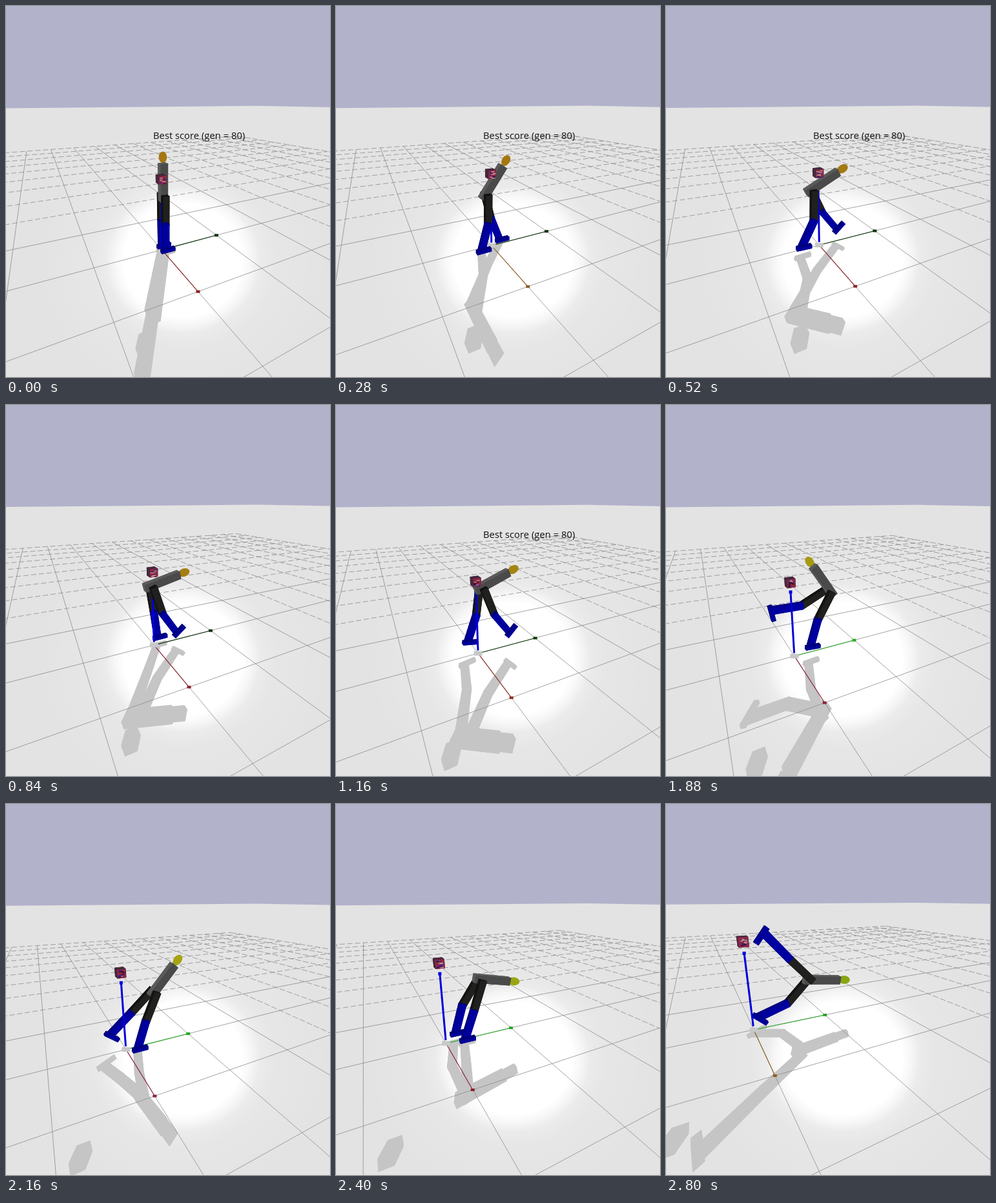
An HTML page with a canvas for the animation above (2840 ms loop, 502 by 575 pixels).

```html
<!DOCTYPE html>
<html lang="en">
<head>
<meta charset="utf-8">
<title>Walker</title>
<style>
html, body { margin: 0; width: 100%; height: 100%; overflow: hidden; }
canvas { display: block; }
</style>
</head>
<body>
<canvas id="stage" width="502" height="575"></canvas>
<script>
const ctx = document.getElementById('stage').getContext('2d');
const W = 502, H = 575, LOOP = 2840, STEP = 40;
const FOCAL = 391, CX = 251, CY = 306, REACH = 3.29;
const rad = deg => deg * Math.PI / 180;
const sinP = Math.sin(rad(22)), cosP = Math.cos(rad(22));
const sinA = Math.sin(rad(26.3)), cosA = Math.cos(rad(26.3));
const LIGHT = [1.24, -0.735];   // ground offset of a shadow per unit of height

// Key poses: seconds, then angles of torso, near thigh and shank, far thigh and shank
const poses = [
  [0,     90,  -90,  -90,  -90,  -90],
  [0.52,  26,  -92, -118,  -66,  -54],
  [0.84,  13,  -72,  -57,  -82,  -83],
  [1.48,  29,  -67,  -51, -115, -138],
  [1.88, 124, -120, -107, -155, -181],
  [2.4,  -12, -109, -110, -125, -107],
  [2.8,   -8, -227, -229, -136, -163]
];

const ease = x => { x = Math.min(1, Math.max(0, x)); return x * x * (3 - 2 * x); };
const noise = n => { const v = Math.sin(n * 12.9898 + 4.1) * 43758.5; return v - Math.floor(v); };

function poseAt(t) {
  const i = Math.min(poses.length - 2, poses.filter(p => p[0] <= t).length - 1);
  const p = poses[i], q = poses[i + 1], s = (t - p[0]) / (q[0] - p[0]);
  return p.slice(1).map((v, k) => v + (q[k + 1] - v) * ease(s));
}

// The camera speeds up along the walk, rides one hop, then sinks with the fall.
const travel = t => 0.12 + 0.03 * t + 0.106 * t * t + 0.028 * Math.sin((t - 0.75) * 3.3);
function altitude(t) {
  const late = t - 1.48;
  return late > 0 ? 2.19 - 0.25 * late - 0.19 * late * late
    : 1.96 + 0.1 * Math.exp(-5 * t) + 0.23 * ease((t - 0.84) / 0.64);
}

let camY, camH;
function view([x, y, z]) {
  const dy = y - camY, dz = z - camH;
  const ahead = REACH + sinA * dy - cosA * x;
  return [sinA * x + cosA * dy, ahead * sinP + dz * cosP, ahead * cosP - dz * sinP];
}
function project(p) {
  const [a, v, depth] = view(p);
  return [CX + FOCAL * a / depth, CY - FOCAL * v / depth];
}
const onGround = ([x, y, z]) => [x + LIGHT[0] * z, y + LIGHT[1] * z, 0];

function fill(points, color) {
  ctx.fillStyle = color;
  ctx.beginPath();
  points.forEach(p => ctx.lineTo(...p));
  ctx.closePath();
  ctx.fill();
}
function line(p, q, color, width) {
  const near = 0.2, dp = view(p)[2], dq = view(q)[2];
  if (dp < near && dq < near) return;
  const cut = (from, to, df, dt) => df >= near ? from :
    from.map((v, k) => v + (to[k] - v) * (near - df) / (dt - df));
  ctx.strokeStyle = color;
  ctx.lineWidth = width;
  ctx.beginPath();
  ctx.moveTo(...project(cut(p, q, dp, dq)));
  ctx.lineTo(...project(cut(q, p, dq, dp)));
  ctx.stroke();
}

// Bar in the walking plane from start to end, given half thickness and half depth.
function bar(x, start, end, half, deep, front, side) {
  const dy = end[0] - start[0], dz = end[1] - start[1], len = Math.hypot(dy, dz);
  const ny = -dz / len * half, nz = dy / len * half;
  const rim = [[start[0] + ny, start[1] + nz], [end[0] + ny, end[1] + nz],
               [end[0] - ny, end[1] - nz], [start[0] - ny, start[1] - nz]];
  const back = rim.map(p => [x - deep, ...p]), face = rim.map(p => [x + deep, ...p]);
  const sides = rim.map((_, i) => [back[i], back[(i + 1) % 4], face[(i + 1) % 4], face[i]]);
  return { faces: [back, ...sides, face], front, side };
}
function drawBar(b) {
  b.faces.forEach((f, i) => fill(f.map(project), i === 5 ? b.front : b.side));
}
function drawShadow(b) {
  b.faces.forEach(f => fill(f.map(p => project(onGround(p))), '#c5c5c5'));
}

const step = (from, deg, len) => [from[0] + len * Math.cos(rad(deg)), from[1] + len * Math.sin(rad(deg))];

function leg(x, hip, thigh, shank) {
  const knee = step(hip, thigh, 0.44), ankle = step(knee, shank, 0.42);
  const foot = (shank + 100) * ease((ankle[1] - 0.05) / 0.12);   // flat near the ground
  return [
    bar(x, hip, knee, 0.047, 0.035, '#20201e', '#131312'),
    bar(x, step(knee, shank, -0.02), ankle, 0.047, 0.035, '#0000a0', '#000082'),
    bar(x, step(ankle, foot, -0.07), step(ankle, foot, 0.15), 0.028, 0.03, '#000098', '#00007c')
  ];
}

function drawGround() {
  ctx.fillStyle = '#b2b2cb';
  ctx.fillRect(0, 0, W, H);
  const edge = [[-100, -100, 0], [-100, 100, 0], [20, 100, 0]].map(project);
  fill([...edge, [W + 50, H + 5], [-50, H + 5]], '#e3e3e3');

  ctx.save();
  ctx.translate(274, 394);
  ctx.scale(1, 0.95);
  const glow = ctx.createRadialGradient(0, 0, 0, 0, 0, 230);
  [[0.4, 1], [0.46, 0.7], [0.52, 0.3], [0.62, 0.13], [1, 0]]
    .forEach(([at, alpha]) => glow.addColorStop(at, `rgba(255,255,255,${alpha})`));
  ctx.fillStyle = glow;
  ctx.fillRect(-230, -230, 460, 460);
  ctx.restore();
}

function drawGrid() {
  for (let i = -10; i <= 10; i++) {
    ctx.setLineDash(i < -1 ? [8, 4] : []);
    line([i, -10, 0], [i, 10, 0], '#8c8c8c', 0.8);
    ctx.setLineDash(i > 2 ? [9, 3] : []);
    line([-10, i, 0], [10, i, 0], '#8c8c8c', 0.8);
  }
  ctx.setLineDash([]);
}

function dot(p, color, w, h) {
  const [x, y] = project(p);
  ctx.fillStyle = color;
  ctx.fillRect(x - w / 2, y - h / 2, w, h);
}

// Cube whose face flickers in red, blue and tan stripes.
function drawMarker(marker, seed) {
  drawBar(marker);
  const [x, y] = project([0.05, 0, 1.1]);
  const colors = ['#281e96', '#a02341', '#c39b91', '#2d142d'];
  for (let i = 0; i < 16; i++) {
    const n = seed * 50 + i * 3;
    ctx.fillStyle = colors[Math.floor(noise(n) * colors.length)];
    ctx.fillRect(x - 6 + noise(n + 1) * 7, y - 5 + i % 8 * 1.4, 3 + noise(n + 2) * 3, 1.4);
  }
}

function drawHead(hip, torso, color) {
  const [x, y] = project([0, ...step(hip, torso, 0.51)]);
  const [tx, ty] = project([0, ...step(hip, torso, 0.6)]);
  ctx.fillStyle = color;
  ctx.beginPath();
  ctx.ellipse(x, y, 9, 6.3, Math.atan2(ty - y, tx - x), 0, 2 * Math.PI);
  ctx.fill();
}

function draw(t) {
  const seed = Math.round(t * 1000 / STEP);
  const [torso, nearThigh, nearShank, farThigh, farShank] = poseAt(t);
  camY = travel(t);
  camH = altitude(t);
  // The camera tracks the middle of the torso.
  const hip = step([camY - 0.075, camH - 1], torso, -0.18);

  const farLeg = leg(-0.07, hip, farThigh, farShank);
  const nearLeg = leg(0.07, hip, nearThigh, nearShank);
  const trunk = bar(0, step(hip, torso, -0.1), step(hip, torso, 0.43), 0.054, 0.045, '#4a4a4a', '#5a5a5a');
  const skull = bar(0, step(hip, torso, 0.44), step(hip, torso, 0.58), 0.05, 0.03);
  const marker = bar(0, [-0.055, 1.1], [0.055, 1.1], 0.055, 0.055, '#8c2846', '#46283c');

  drawGround();
  [...farLeg, skull, trunk, ...nearLeg, marker].forEach(drawShadow);
  drawGrid();

  const xColor = `hsl(${5 + 60 * (noise(seed) - 0.5)}, 62%, 34%)`;
  const yColor = `hsl(118, 65%, ${12 + 28 * ease((t - 1) / 0.8)}%)`;
  line([0, 0, 0], [1, 0, 0], xColor, 1.1);
  line([0, 0, 0], [0, 1, 0], yColor, 1.1);
  dot([1, 0, 0], xColor, 6, 4);
  dot([0, 1, 0], yColor, 6, 4);
  dot([0, 0, 0], '#c8c8c8', 13, 7);

  farLeg.forEach(drawBar);
  line([0, 0, 0.05], [0, 0, 0.98], '#0000dc', 3);
  dot([0, 0, 0.97], '#0000dc', 5, 5);
  drawHead(hip, torso, `hsl(${41 + 4 * t * t}, 80%, 36%)`);
  [trunk, ...nearLeg].forEach(drawBar);
  drawMarker(marker, seed);

  if (t < 0.68 || (t >= 1.16 && t < 1.68)) {
    ctx.fillStyle = '#111';
    ctx.font = '14.8px "Open Sans", sans-serif';
    ctx.fillText('Best score (gen = 80)', 228, 206);
  }
}

function tick() {
  draw(Math.floor(performance.now() % LOOP / STEP) * STEP / 1000);
  requestAnimationFrame(tick);
}
tick();
</script>
</body>
</html>
```
